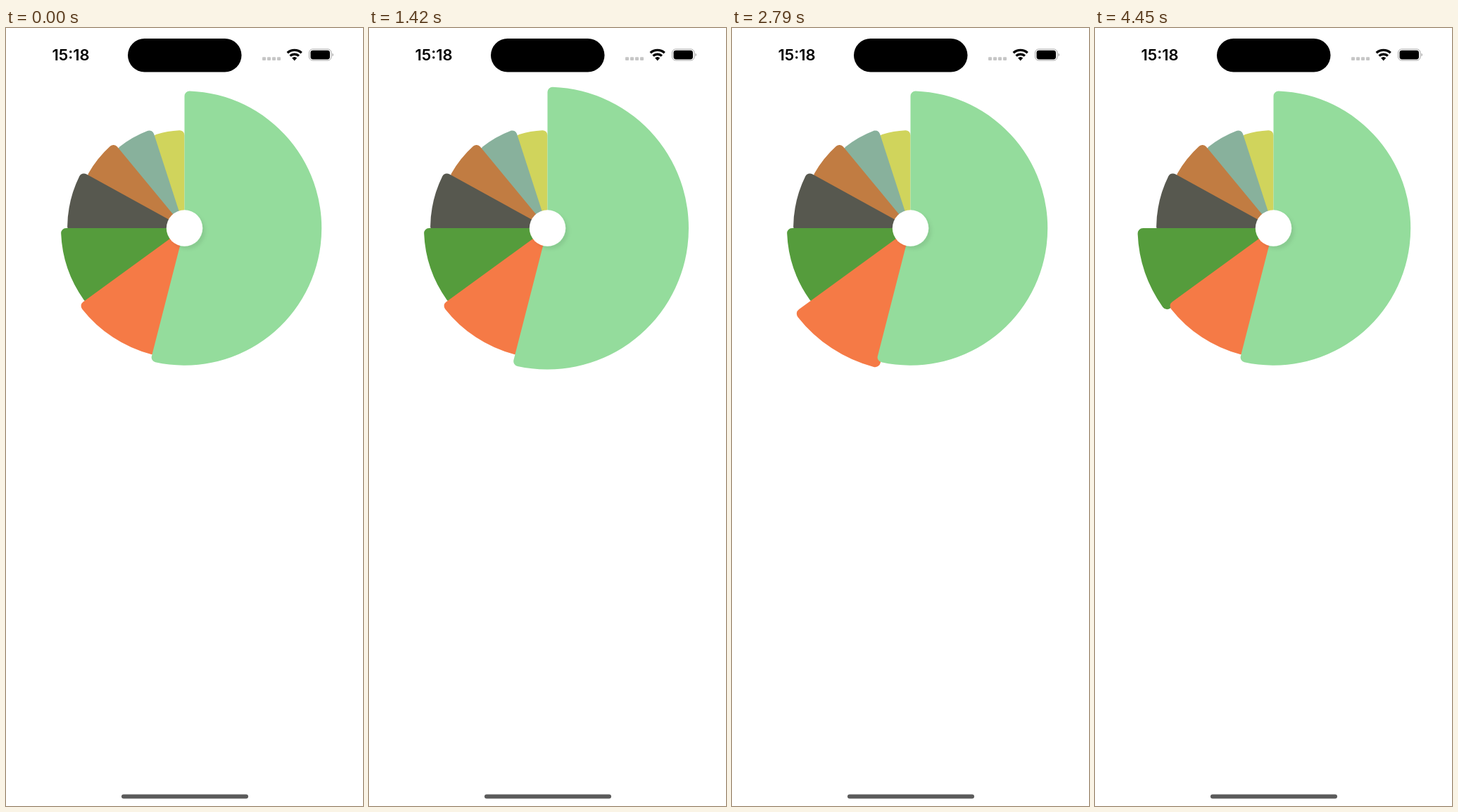
Recreate the animation shown at these times as an HTML page. Size 507 px wide and 1104 px high, loop 4480 ms.

```html
<!DOCTYPE html>
<html lang="en">
<head>
<meta charset="utf-8">
<title>Pie chart selection</title>
<style>
  html, body { margin: 0; width: 100%; height: 100%; overflow: hidden; background: #fff; }
  svg { display: block; width: 100%; height: 100%; }
  text { font: 600 22px Inter, "Liberation Sans", sans-serif; text-anchor: middle; }
</style>
</head>
<body>
<svg viewBox="0 0 507 1104">
  <defs>
    <filter id="shadow" x="-50%" y="-50%" width="200%" height="200%">
      <feDropShadow dx="4" dy="4" stdDeviation="2.5" flood-color="#000" flood-opacity=".08"/>
    </filter>
  </defs>

  <text x="92" y="46">15:18</text>
  <rect x="173" y="15" width="161.5" height="47.5" rx="23.75"/>
  <g fill="#c6c6c6">
    <rect x="364" y="41.2" width="5" height="4.8" rx="1"/>
    <rect x="371" y="41.2" width="5" height="4.8" rx="1"/>
    <rect x="378" y="41.2" width="5" height="4.8" rx="1"/>
    <rect x="385" y="41.2" width="5" height="4.8" rx="1"/>
  </g>
  <g id="wifi" transform="translate(409.7 46.6)" fill="none" stroke="#000"></g>
  <rect x="430.5" y="30" width="31.5" height="16" rx="5" fill="none" stroke="#a6a6a6"/>
  <rect x="432.5" y="31.8" width="27.5" height="12.6" rx="3.4"/>
  <path d="M463.5 35.5q3 2.5 0 5z" fill="#a6a6a6"/>

  <g id="pie" transform="translate(253.5 284)"></g>
  <circle cx="253.5" cy="284" r="25.7" fill="#fff" filter="url(#shadow)"/>

  <rect x="164" y="1087.5" width="180" height="6" rx="3" fill="#5b5b5b"/>
</svg>
<script>
const LOOP = 4480, CORNER = 7, OVERLAP = 0.5, GROWTH = 0.1;

// percent of the pie, outer radius, colour
const slices = [
  [54, 194.7, '#94dc9c'],
  [11, 185.2, '#f57a46'],
  [10, 175.5, '#559c3c'],
  [8, 166.4, '#57584f'],
  [6, 157, '#c17c42'],
  [6, 147.8, '#88b19c'],
  [5, 139, '#d0d45c']
];

// slice, first and last change in ms, step count, start and end of growth
const moves = [
  [0, 820, 1030, 8, 0, 1],
  [0, 1330, 1580, 9, 1, 0],
  [1, 2550, 2790, 9, 0, 1],
  [1, 3120, 3360, 9, 1, 0],
  [2, 4240, 4450, 8, 0, 1]
];

const polar = (r, a) => `${(r * Math.sin(a)).toFixed(2)} ${(-r * Math.cos(a)).toFixed(2)}`;

function addPath(parent, attrs) {
  const path = document.createElementNS('http://www.w3.org/2000/svg', 'path');
  for (const key in attrs) path.setAttribute(key, attrs[key]);
  parent.prepend(path);
  return path;
}

function sectorPath(r, a0, a1) {
  const inset = Math.asin(CORNER / (r - CORNER));
  const side = Math.sqrt((r - CORNER) ** 2 - CORNER ** 2);
  const large = a1 - a0 - 2 * inset > Math.PI ? 1 : 0;
  const corner = `A${CORNER} ${CORNER} 0 0 1 `;
  return `M0 0L${polar(side, a0)}${corner}${polar(r, a0 + inset)}` +
    `A${r} ${r} 0 ${large} 1 ${polar(r, a1 - inset)}${corner}${polar(side, a1)}Z`;
}

const wifi = document.getElementById('wifi');
for (const [r, width] of [[15.2, 3.4], [9.4, 3.4], [2.7, 5.4]]) {
  addPath(wifi, {
    d: `M${polar(r, -0.72)}A${r} ${r} 0 0 1 ${polar(r, 0.72)}`,
    'stroke-width': width
  });
}

// Each slice tucks its leading edge under the previous one.
const pie = document.getElementById('pie');
const turn = percent => percent / 50 * Math.PI;
let sum = 0;
const paths = slices.map(([share, r, fill]) => {
  const start = sum ? sum - OVERLAP : 0;
  sum += share;
  return addPath(pie, { d: sectorPath(r, turn(start), turn(sum)), fill });
});

const easeOut = p => 1 - (1 - p) ** 3;

function render(t) {
  const growth = slices.map(() => 0);
  for (const [slice, first, last, steps, from, to] of moves) {
    if (t < first) continue;
    const step = Math.floor((t - first) / (last - first) * (steps - 1) + 0.001) + 1;
    growth[slice] = from + (to - from) * easeOut(Math.min(step / steps, 1));
  }
  paths.forEach((path, i) => path.setAttribute('transform', `scale(${1 + GROWTH * growth[i]})`));
}

const begin = performance.now();
function tick() {
  render((performance.now() - begin) % LOOP);
  requestAnimationFrame(tick);
}
tick();
</script>
</body>
</html>
```
